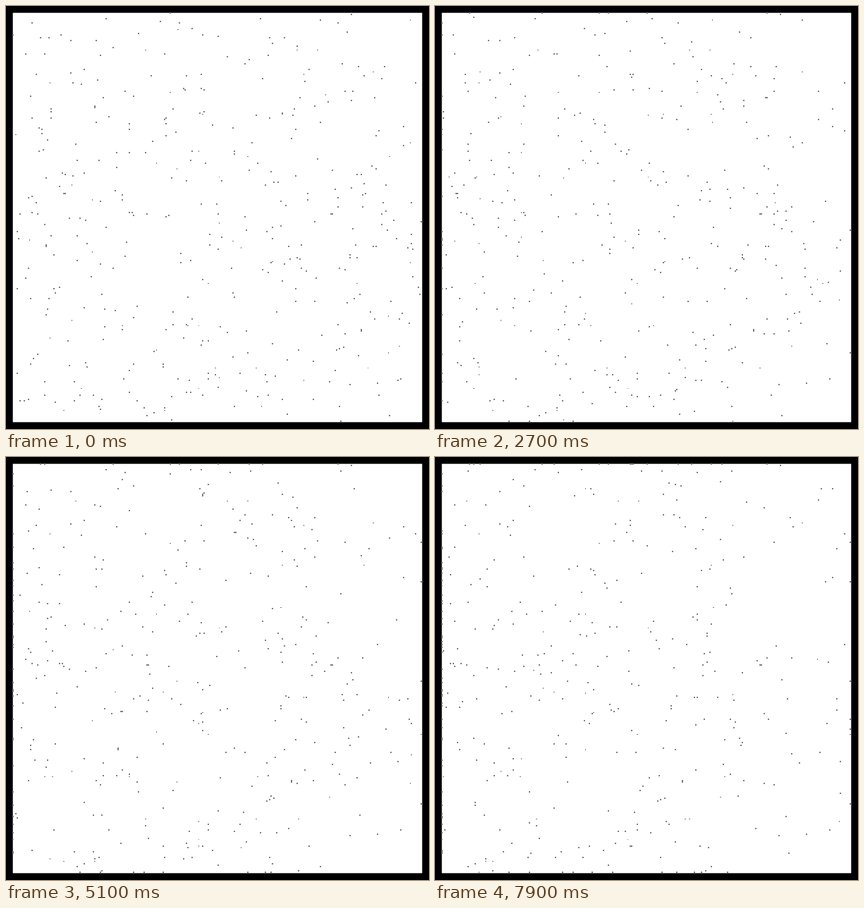
These frames come from a looping animation (600x600 px, 8 s). An HTML page with a canvas:

```html
<!DOCTYPE html>
<html lang="en">
<head>
<meta charset="utf-8">
<title>Drifting particles</title>
<style>
  html, body { margin: 0; width: 100%; height: 100%; overflow: hidden; background: #000; }
  canvas { display: block; }
</style>
</head>
<body>
<canvas id="stage" width="600" height="600"></canvas>
<script>
const ctx = document.getElementById('stage').getContext('2d');
const SIZE = 600, CELLS = 310, WALL = 5, COUNT = 420;
const STEP = 100, STEPS = 80;
const CELL = SIZE / CELLS;
const FIRST = WALL, LAST = CELLS - WALL - 1;

const edge = c => Math.floor(c * CELL + 0.1);
const clamp = c => Math.max(FIRST, Math.min(LAST, c));

let seed = 20417;
function random() {
  seed = (seed * 1664525 + 1013904223) % 4294967296;
  return seed / 4294967296;
}
const randomCell = () => FIRST + Math.floor(random() * (LAST - FIRST + 1));

// Each direction with the share of dots that take it
const KINDS = [
  { share: 0.20, dx: 0, dy: 0 },
  { share: 0.50, dx: -1, dy: 0 },
  { share: 0.15, dx: 0, dy: -1 },
  { share: 0.07, dx: 0, dy: 1 },
  { share: 0.08, dx: 1, dy: 0 }
];
function pickKind() {
  let left = random();
  return KINDS.find(kind => (left -= kind.share) < 0) || KINDS[0];
}

const dots = Array.from({ length: COUNT }, () => {
  const { dx, dy } = pickKind();
  return { x: randomCell(), y: randomCell(), dx, dy };
});

// Landmarks that never move
for (const [px, py] of [[142, 18], [112, 90], [254, 119], [282, 119], [59, 430], [462, 296], [464, 296], [57, 245]])
  dots.push({ x: Math.floor(px / CELL), y: Math.floor(py / CELL), dx: 0, dy: 0 });

function draw(time) {
  const step = Math.floor(time / STEP) % STEPS;
  const inset = WALL * CELL;
  ctx.fillStyle = '#000';
  ctx.fillRect(0, 0, SIZE, SIZE);
  ctx.fillStyle = '#fff';
  ctx.fillRect(inset, inset, SIZE - 2 * inset, SIZE - 2 * inset);
  ctx.fillStyle = '#808080';
  for (const { x, y, dx, dy } of dots) {
    const cx = clamp(x + dx * step), cy = clamp(y + dy * step);
    const px = edge(cx), py = edge(cy);
    ctx.fillRect(px, py, edge(cx + 1) - px, edge(cy + 1) - py);
  }
}

const start = performance.now();
function loop() {
  draw(performance.now() - start);
  requestAnimationFrame(loop);
}
loop();
</script>
</body>
</html>
```
